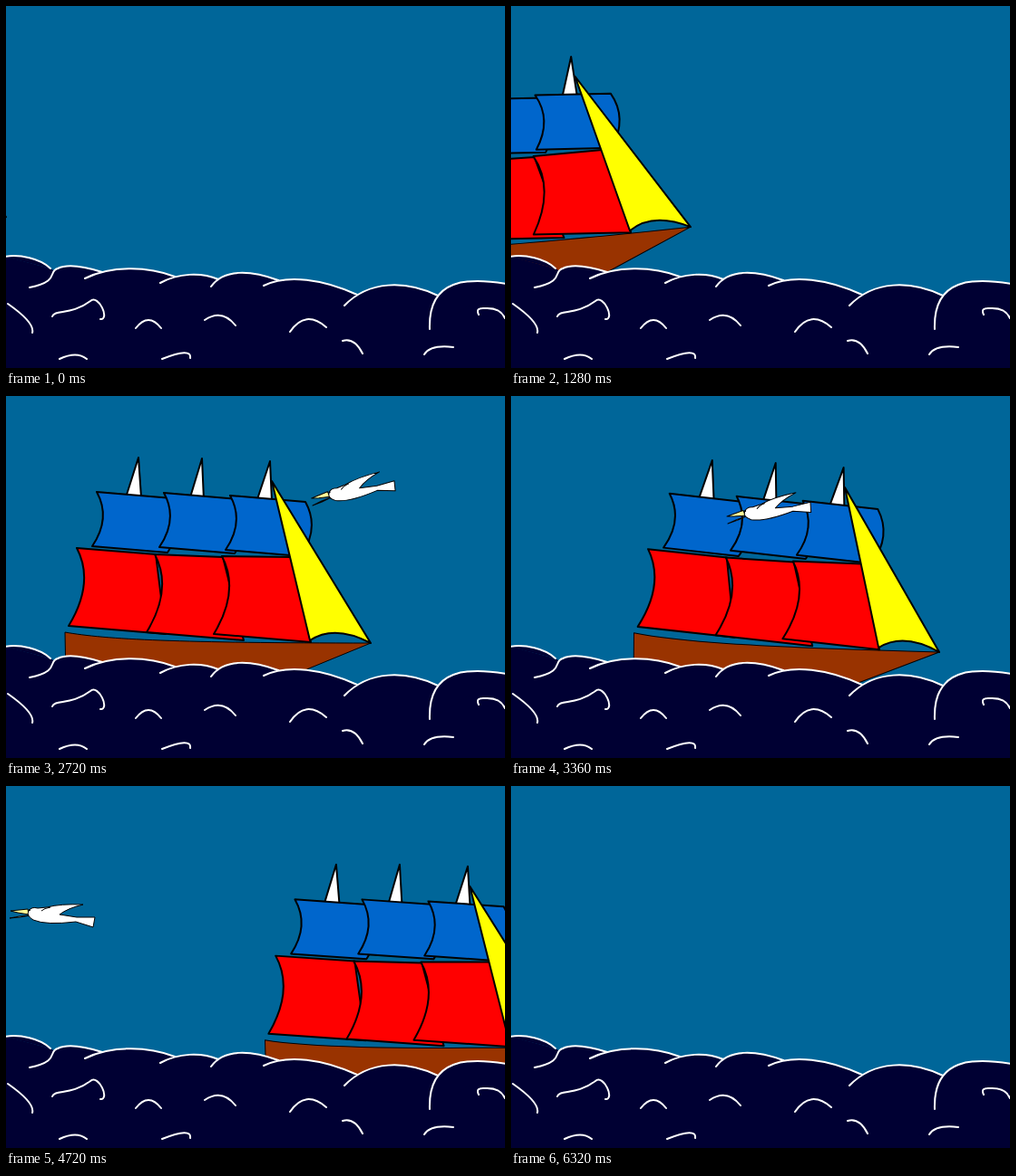
Write an HTML page that moves like this. It is 550 by 400 pixels and loops after 6400 ms.

```html
<!DOCTYPE html>
<html lang="en">
<head>
<meta charset="utf-8">
<title>Sailing ship</title>
<style>
html, body { margin: 0; width: 100%; height: 100%; overflow: hidden; background: #069; }
svg { display: block; }
</style>
</head>
<body>
<svg width="550" height="400" viewBox="0 0 550 400">
  <g id="ship" stroke="#000" stroke-width="2" stroke-linejoin="round">
    <path fill="#930" stroke-width="1" d="M65,261 C110,269 190,273 402,273 L300,315 H66 Z"/>
    <path fill="#fff" d="M146,68 L133,109 L149,112 Z M216,69 L203,112 L218,115 Z M291,72 L277,114 L293,117 Z"/>
    <g id="lower" fill="#f00"></g>
    <g id="upper" fill="#06c"></g>
    <path fill="#ff0" d="M293,94 L335,270 Q362,252 402,273 Z"/>
  </g>
  <g id="bird" fill="#fff" stroke="#000" stroke-linejoin="round">
    <path fill="#ff9" d="M1,-8 L20,-10 L21,-4 L9,-6 Z"/>
    <path d="M0,0 L11,-2 L22,-3 L11,-1 Z"/>
    <path d="M21,-8 Q24,-13 31,-11 L41,-12 Q56,-16 81,-15 Q64,-11 55,-4 L74,-1 H94 L92,10 L73,4 Q40,8 26,2 Q18,-3 21,-8 Z"/>
    <path d="M35,-8 Q38,-11 45,-12" fill="none"/>
    <circle cx="22" cy="-9" r="1" fill="#000" stroke="none"/>
  </g>
  <g fill="#003">
    <path d="M0,277 L49,290 L54,293 L106,294 L186,299 L234,302 L300,303 L387,319 L476,320 L550,307 V400 H0 Z"/>
    <path stroke="#fff" stroke-width="2" stroke-linecap="round" d="
      M-2,277 C15,274 38,279 49,290
      M26,311 C60,304 46,293 57,290 C67,285 87,288 106,294
      M87,301 C115,287 155,287 186,299
      M170,306 C190,295 215,294 234,302
      M226,310 C240,290 270,292 300,303
      M284,309 C310,296 350,302 387,319
      M373,331 C400,303 440,303 476,320
      M467,357 C465,300 510,300 552,307
      M2,329 Q32,350 29,361
      M51,343 C54,335 72,342 93,326 C102,318 115,347 104,346
      M143,356 Q157,338 171,356
      M219,347 Q238,334 253,353
      M313,360 Q330,335 353,355
      M371,370 Q384,366 393,384
      M461,385 Q468,374 493,377
      M59,390 Q78,381 89,390
      M172,390 Q205,377 203,389
      M521,341 Q517,333 528,334 Q545,333 550,345"/>
  </g>
</svg>
<script>
const STEP = 80, LOOP = 6400;
const get = id => document.getElementById(id);
const ship = get('ship'), bird = get('bird');

const path = d => `<path d="${d}"/>`;
const upperSail = ([x, y]) =>
  path(`M${x},${y} l83,7 q16,29 -5,60 l-83,-7 q21,-31 5,-60 Z`);
const lowerSail = ([x, y, w, h]) =>
  path(`M${x},${y} l${w},${h} L${x + 98},${y + 95} l-107,-9 q29,-48 9,-86 Z`);

get('upper').innerHTML = [[100, 106], [174, 107], [247, 110]].map(upperSail).join('');
get('lower').innerHTML =
  [[78, 168, 87, 7], [164, 175, 75, 3], [238, 177, 76, 1]].map(lowerSail).join('');

// Keys: step, x, y, angle
const shipKeys = [
  [0, -169.7, 167.3, -6.1], [16, 28.3, 178.3, -6.1], [20, 78.5, 179, -5.9],
  [24, 128, 180, -4.7], [30, 203, 186.6, -1.5], [34, 240.3, 189.5, 0],
  [42, 312.7, 195.1, 1.57], [46, 347.5, 193.5, 2.6], [59, 459.8, 207, -0.75],
  [68, 570, 194, -6.2], [72, 621, 194, -6.2], [79, 719, 194, -6.2]
];
const birdKeys = [
  [0, 867, 6, -15], [24, 483, 88, -15], [27, 437, 98, -15.5], [34, 338, 121, -16.3],
  [42, 239, 141, -14], [54, 80, 147, -4], [59, 4, 146, 0], [66, -101, 144, 2], [80, -311, 140, 2]
];
birdKeys.splice(1, 0, [18, 579, 66, -15]);

function pose(keys, step) {
  const next = Math.max(1, keys.findIndex(k => k[0] >= step));
  const a = keys[next - 1], b = keys[next];
  const p = (step - a[0]) / (b[0] - a[0]);
  const [, x, y, angle] = a.map((v, i) => v + (b[i] - v) * p);
  return `translate(${x} ${y}) rotate(${angle})`;
}

function draw(now) {
  const step = Math.floor(now % LOOP / STEP);
  ship.setAttribute('transform', pose(shipKeys, step) + ' translate(-240.3 -189.5)');
  bird.setAttribute('transform', pose(birdKeys, step));
  requestAnimationFrame(draw);
}
draw(performance.now());
</script>
</body>
</html>
```
